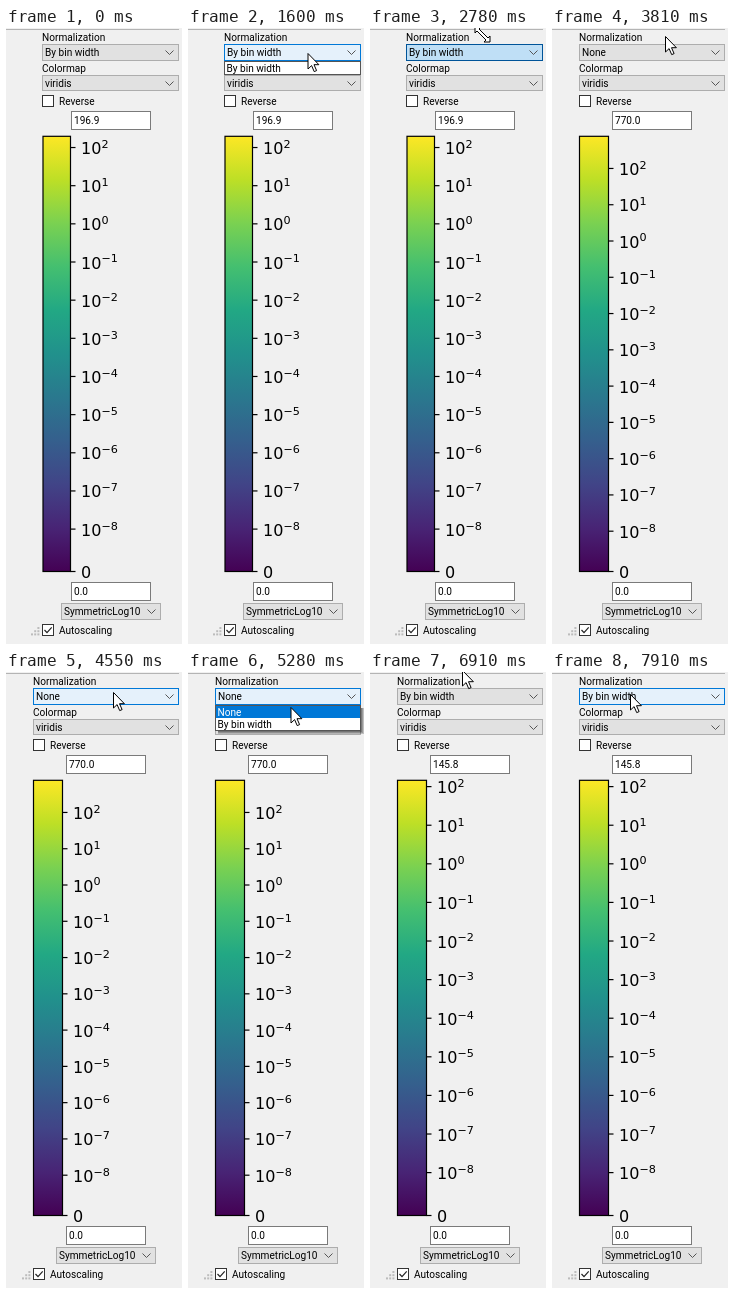
Animation of 176x616 px, one loop 8000 ms. Source, as an HTML page:

```html
<!DOCTYPE html>
<html lang="en">
<head>
<meta charset="utf-8">
<title>Colorbar settings</title>
<style>
  html, body { margin: 0; width: 100%; height: 100%; overflow: hidden; background: #f0f0f0; }
  svg { display: block; }
  text { font: 10.1px Roboto, sans-serif; fill: #000; white-space: pre; }
  .tick { font: 16px "DejaVu Sans", sans-serif; }
  .exp { font-size: 11.2px; }
</style>
</head>
<body>
<svg id="stage" width="176" height="616" viewBox="0 0 176 616"></svg>
<script>
const LOOP = 8000, STEP = 90, RIGHT = 173;
const stage = document.getElementById('stage');
const viridis = ['#440154', '#482475', '#414487', '#355f8d', '#2a788e', '#21918c',
  '#22a884', '#44bf70', '#7ad151', '#bddf26', '#fde725'];

// Pointer moves: start, steps, from x, y, to x, y, downward bulge
const moves = [
  [500, 6, 128, 2, 119.5, 25, 0],
  [1950, 2, 110, 31, 101, 36, 0],
  [2690, 2, 103, 18, 112.5, 6.5, 0],
  [3810, 4, 113, 8, 108, 20, 0],
  [4550, 1, 107, 20, 107, 20, 0],
  [5200, 2, 105, 28, 102.5, 35, 0],
  [5380, 5, 101, 38, 94.5, 47, 0],
  [6010, 9, 94, 47.5, 92, -2, 0],
  [7180, 2, 130, -2, 164, -2, 0],
  [7550, 5, 164, 10, 78, 22, 22]
];

// Layout and data by time
const views = [
  [0, { left: 36, barL: 36.5, barR: 64.5, max: 196.9, mode: 'By bin width' }],
  [2970, { left: 27, barL: 27, barR: 56.5, max: 770, mode: 'None' }],
  [6370, { left: 27, barL: 27, barR: 56.5, max: 145.8, mode: 'By bin width' }]
];

// Fill and border of the first drop-down
const normal = ['#e1e1e1', '#adadad'], hover = ['#e5f1fb', '#0078d7'],
  warm = ['#e3e9ee', '#5693c2'], pressing = ['#d2e8f8', '#0066b8'],
  pressed = ['#bfdff6', '#005499'], fading = ['#d0e0ec', '#5781a1'];
const looks = [[0, normal], [770, warm], [860, hover], [1950, pressing], [2040, pressed],
  [2970, normal], [4000, warm], [4100, hover], [5380, pressing], [5470, pressed],
  [6820, fading], [6910, normal], [7820, warm], [7910, hover]];

// Visible height of the list and its highlighted row
const lists = [[0, [0]], [1600, [14, -1]], [1680, [20, 1]], [1770, [26, 1]], [2040, [26, 0]],
  [2310, [0]], [5020, [14, -1]], [5110, [20, 0]], [5200, [26, 0]], [5470, [26, 1]], [5740, [0]]];

const at = (keys, t) => keys.filter(k => k[0] <= t).pop()[1];
const rect = (x, y, w, h, fill, line) => line
  ? `<rect x="${x + .5}" y="${y + .5}" width="${w - 1}" height="${h - 1}" fill="${fill}" stroke="${line}"/>`
  : `<rect x="${x}" y="${y}" width="${w}" height="${h}" fill="${fill}"/>`;
const text = (x, y, s, extra = '') => `<text x="${x}" y="${y}" ${extra}>${s}</text>`;
const path = (d, line, width = 1, fill = 'none') =>
  `<path d="${d}" stroke="${line}" stroke-width="${width}" fill="${fill}"/>`;

function combo(x, y, w, h, label, [fill, line] = normal) {
  return rect(x, y, w, h, fill, line) + text(x + 3, y + 12.3, label) +
    path(`M${x + w - 13.5} ${y + 6.5}l4 4l4 -4`, '#555');
}

function edit(x, y, value) {
  return rect(x, y, 80, 19, '#fff', '#7a7a7a') + text(x + 3, y + 13.2, value);
}

function check(x, y, label, on) {
  return rect(x, y, 12, 12, '#fff', '#333') + text(x + 17, y + 9.5, label) +
    (on ? path(`M${x + 2.5} ${y + 6}l2.5 2.7l4.7 -5.4`, '#222', 1.2) : '');
}

function colorbar({ barL, barR, max }) {
  const top = 108.3, zero = 543.5, top10 = Math.log10(max);
  const decade = (zero - top) / (top10 + 8 + 10 / 9);
  const tick = y => path(`M${barR} ${y}h5`, '#000', 1.2);
  const x = barR + 10.5;
  let out = `<rect x="${barL + .5}" y="${top}" width="${barR - barL - .5}" height="${zero - top}"
    fill="url(#ramp)" stroke="#000" stroke-width="1.2"/>`;
  for (let e = 2; e >= -8; e--) {
    const y = top + (top10 - e) * decade;
    out += tick(y) + text(x, y + 6.5, '10', 'class="tick"') +
      text(x + 20.4, y + .4, String(e).replace('-', '\u2212'), 'class="tick exp"');
  }
  return out + tick(zero) + text(x, zero + 6, '0', 'class="tick"');
}

function grip(x, y) {
  let out = '';
  for (let r = 0; r < 3; r++)
    for (let c = 2 - r; c < 3; c++) out += rect(x + c * 3.2, y + r * 3.2, 2, 2, '#bcbcbc');
  return out;
}

function popup(x, [h, active]) {
  if (!h) return '';
  const w = RIGHT - x, rows = ['None', 'By bin width'];
  const shadow = h < 26 ? '' : [3, 2, 1].map(d =>
    rect(x + 3, 36, w - 3 + d, h - 3 + d, 'rgba(0,0,0,.2)')).join('');
  const items = rows.map((s, i) => {
    const y = h - 26 + i * 12;
    return (i === active ? rect(0, y, w, 12, '#0078d7') : '') +
      text(1.5, y + 9.7, s, i === active ? 'style="fill:#fff"' : '');
  }).join('');
  return shadow + rect(x, 33, w, h, '#fff', '#555') +
    `<svg x="${x + 1}" y="34" width="${w - 2}" height="${h - 2}">${items}</svg>`;
}

function pointer(t) {
  const move = moves.filter(m => m[0] <= t).pop();
  if (!move || (t >= 2970 && t < 3810)) return '';
  const [start, steps, x0, y0, x1, y1, bulge] = move;
  const i = Math.min(steps - 1, Math.floor((t - start + 10) / STEP));
  const k = steps > 1 ? i / (steps - 1) : 1;
  const x = x0 + (x1 - x0) * k;
  const y = y0 + (y1 - y0) * k + bulge * Math.sin(Math.PI * k);
  const shape = t >= 2780 && t < 2970
    ? 'M-7.5 -7.5h6l-2 2l9 9l2 -2v6h-6l2 -2l-9 -9l-2 2z'
    : 'M.5 .5v15.5l3.6 -3.4l2.6 6l2.4 -1l-2.6 -5.9h4.9z';
  return `<g transform="translate(${x} ${y})">${path(shape, '#000', 1, '#fff')}</g>`;
}

const ramp = `<defs><linearGradient id="ramp" x1="0" y1="1" x2="0" y2="0">${
  viridis.map((c, i) => `<stop offset="${i / 10}" stop-color="${c}"/>`).join('')
}</linearGradient></defs>`;

function scene(t) {
  const view = at(views, t), x = view.left, w = RIGHT - x, mid = (x + RIGHT) / 2;
  const editX = Math.round(mid - 40);
  return ramp + rect(0, 0, 176, 616, '#f0f0f0') + rect(0, 1, RIGHT, 1, '#b4b4b4') +
    text(x, 13.3, 'Normalization') + combo(x, 16, w, 17, view.mode, at(looks, t)) +
    text(x, 44, 'Colormap') + combo(x, 47, w, 16, 'viridis') +
    check(x, 67, 'Reverse') +
    edit(editX, 83, view.max.toFixed(1)) +
    colorbar(view) +
    edit(editX, 554, '0.0') +
    combo(Math.round(mid - 50), 575, 100, 17, 'SymmetricLog10') +
    check(x, 596, 'Autoscaling', true) + grip(x - 11, 599) +
    popup(x, at(lists, t)) + pointer(t);
}

let last = '';
function draw(now) {
  const next = scene(now % LOOP);
  if (next !== last) stage.innerHTML = last = next;
  requestAnimationFrame(draw);
}
draw(performance.now());
</script>
</body>
</html>
```
